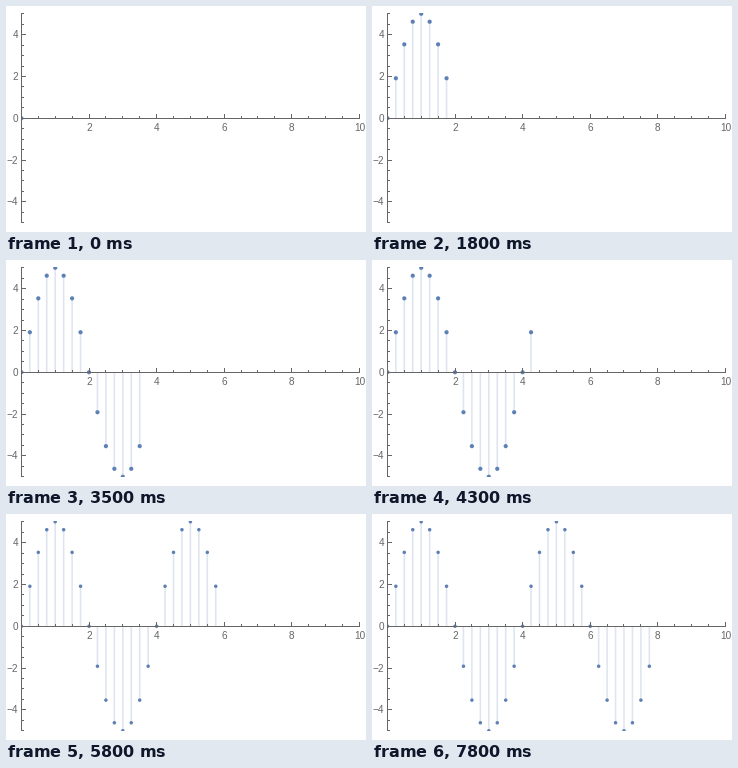
A matplotlib script for the animation above (8000 ms loop, 360 by 226 pixels).

```python
import math

import matplotlib.pyplot as plt
from matplotlib.animation import FuncAnimation
from matplotlib.patches import Circle, Rectangle

W, H, DPI = 360, 226, 64
X0, Y0 = 15.4, 112.25        # pixel position of the plot's zero point
SX, SY = 33.8, 20.9          # pixels per unit
LEFT, TOP, RIGHT, BOTTOM = 15, 7, 354, 217
AXIS_ROW = 112
GRAY = "#666666"
BLUE = "#5e81b5"
STEP, COUNT = 0.25, 32
BIG, SMALL, BIG_LIMIT = 2.1, 1.75, 20


def to_x(x):
    return X0 + SX * x


def to_y(y):
    return Y0 - SY * y


fig = plt.figure(figsize=(W / DPI, H / DPI), dpi=DPI, facecolor="white")
ax = fig.add_axes([0, 0, 1, 1])
ax.set_xlim(0, W)
ax.set_ylim(H, 0)
ax.axis("off")


def bar(x, y, w, h):
    """Crisp axis or tick on whole pixels."""
    ax.add_patch(Rectangle((x, y), w, h, fc=GRAY, lw=0, zorder=5))


def label(x, baseline, value, align):
    text = str(value).replace("-", "\u2212")
    ax.text(x, baseline, text, ha=align, va="baseline", color=GRAY,
            family="Liberation Sans", fontsize=10 * 72 / DPI, zorder=5)


def draw_axes():
    bar(LEFT, AXIS_ROW, RIGHT - LEFT, 1)
    bar(LEFT, TOP, 1, BOTTOM - TOP)
    for i in range(1, 21):
        px, major = math.floor(to_x(i / 2)), i % 4 == 0
        size = 4 if major else 2
        bar(px, AXIS_ROW - size, 1, size)
        if major:
            label(px + 0.5, 125, i // 2, "center")
    for i in range(-10, 11):
        py, major = math.floor(to_y(i / 2)), i % 4 == 0
        bar(LEFT + 1, py, 4 if major else 2, 1)
        if major:
            label(12.3, py + 4, i // 2, "right")


def make_samples():
    clip = Rectangle((LEFT, TOP), RIGHT - LEFT, BOTTOM - TOP,
                     transform=ax.transData)
    stems, dots = [], []
    for k in range(COUNT):
        x = k * STEP
        px, py = to_x(x), to_y(5 * math.sin(math.pi * x / 2))
        stem, = ax.plot([px, px], [Y0, py], color=BLUE, alpha=0.2,
                        lw=1.6 * 72 / DPI, solid_capstyle="butt",
                        snap=False, zorder=2)
        dot = ax.add_patch(Circle((px, py), BIG, fc=BLUE, lw=0, zorder=3))
        for part in (stem, dot):
            part.set_clip_path(clip)
        stems.append(stem)
        dots.append(dot)
    return stems, dots


draw_axes()
stems, dots = make_samples()


def update(frame):
    # Two new samples every 500 ms: after 300 ms and after 500 ms.
    pairs, rest = divmod(frame, 5)
    shown = 2 * pairs + (rest >= 3) + 1
    radius = BIG if shown <= BIG_LIMIT else SMALL
    for k, (stem, dot) in enumerate(zip(stems, dots)):
        stem.set_visible(0 < k < shown)
        dot.set_visible(k < shown)
        dot.set_radius(radius)
    return stems + dots


anim = FuncAnimation(fig, update, frames=80, interval=100, repeat=True,
                     repeat_delay=0, blit=False)
plt.show()
```
